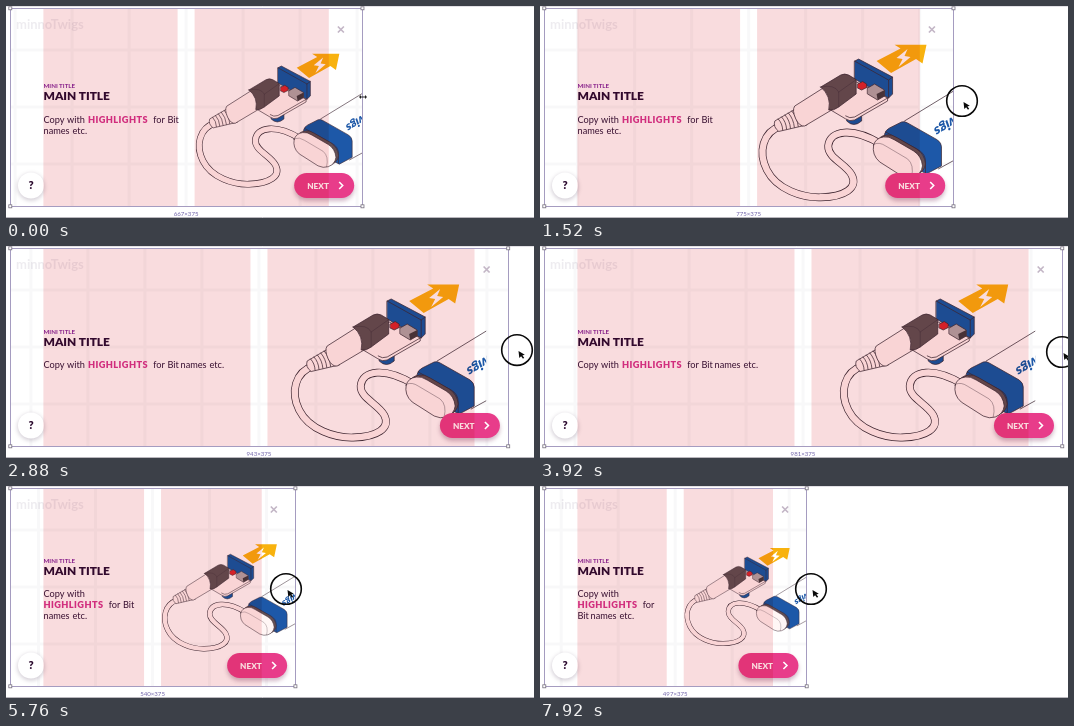
Animation, 528 px wide and 212 px high, one loop 8000 ms. Source, as an HTML page:

```html
<!DOCTYPE html>
<html lang="en">
<head>
<meta charset="utf-8">
<title>Responsive card</title>
<style>
  html, body { margin: 0; width: 100%; height: 100%; overflow: hidden; background: #fff; }
  svg { display: block; width: 528px; height: 212px; }
  text { font-family: Lato, "Open Sans", sans-serif; }
  .line { stroke: #3f2a36; stroke-width: .75; stroke-linejoin: round; stroke-linecap: round; }
  .pale { fill: #fff6f5; }
  .blue { fill: #1d58a8; }
  .brown { fill: #655155; }
  .col { fill: #f9dcde; mix-blend-mode: multiply; }
  .copy { font-size: 9.2px; fill: #3a1238; }
  .strong { font-weight: 900; fill: #d63490; letter-spacing: .4px; }
</style>
</head>
<body>
<svg viewBox="0 0 528 212" xmlns="http://www.w3.org/2000/svg">
  <defs>
    <clipPath id="boardClip"><rect id="clipBox" x="4" y="2" height="198"/></clipPath>
    <clipPath id="artClip"><rect x="290" y="20" width="205" height="185"/></clipPath>
    <filter id="soft" x="-40%" y="-40%" width="180%" height="200%"><feGaussianBlur stdDeviation="2"/></filter>
    <path id="lead" fill="none" d="M322 120C304 126 299 146 308 164C318 184 344 192 362 191.500C386 191 400 182 393 169C387 158 369 152 369.500 140C371 124 394 121 422 138"/>
    <path id="shell" d="M415 139Q417 132 425 131 430 130 436 134L455 145Q463 150 464 160 463 168 455 171 449 173 443 170L421 156Q413 149 415 139Z"/>
  </defs>
  <rect width="528" height="212" fill="#fff"/>
  <path d="M0 .5H528" stroke="#e3e1e6"/>
  <path d="M0 211.5H528" stroke="#b9b7bd"/>

  <g clip-path="url(#boardClip)">
    <rect x="4" y="2" width="524" height="198" fill="#fff"/>
    <path id="grid" fill="none" stroke="#6a5a78" stroke-opacity=".045" stroke-width="3"/>
    <text x="10" y="23" font-size="13" font-weight="700" fill="#5c4668" fill-opacity=".1">minnoTwigs</text>

    <g id="art"><g clip-path="url(#artClip)">
      <!-- power arrow -->
      <path fill="#f8b20e" d="M418 55L442 42.500 436 38.500 468 38.500 464 57.500 457.500 53 432.500 67Z"/>
      <path fill="#fff" d="M449 43L438 52 444 53 440 61 452 51 446 50Z"/>

      <!-- small board -->
      <path class="blue line" d="M388 108V115Q395 122 403 115V107Z"/>
      <path class="blue line" d="M396 55L400 53 434 71V88L430 92 396 73Z"/>
      <path class="line" fill="none" d="M396 55L430 74V92M430 74L434 71"/>
      <path class="pale line" d="M366 100L398 76 429 92V95L396 114Q391 116 387 113Z"/>
      <path class="line" fill="none" d="M387 110Q391 113 396 111L429 92"/>
      <path class="line" fill="#d9262e" d="M399 78L404 75.500 408 78V81.500L403 84 399 82Z"/>
      <path class="line" fill="#b3a8aa" d="M409 82L416 78 426 84V90L419 94 409 88Z"/>
      <path fill="#4a3a3f" d="M418 88L426 84V90L419 94Z"/>

      <!-- lead -->
      <use href="#lead" stroke="#3f2a36" stroke-width="7.800"/>
      <use href="#lead" stroke="#fff6f5" stroke-width="6.400"/>

      <!-- barrel plug and socket -->
      <path class="pale line" d="M340 101L316 115Q314 121 320 125.500L348 119Z"/>
      <path id="ribs" class="line" fill="none"/>
      <path class="pale line" d="M366 81L336 100Q333 104 337 113 341 121 346 120L378 101Z"/>
      <path class="brown line" d="M362 81L382 69Q386 67 390 69L397.500 73.500V88L380 101Q375 105 370 104 373 90 362 81Z"/>
      <path class="line" fill="none" d="M362 81Q376 78 380 86V101M380 86L397 74" stroke-opacity=".5"/>

      <!-- large module -->
      <path class="line" fill="none" d="M446 115L500 82M480 163L500 152"/>
      <path class="blue line" d="M426 128Q427 124 431 122L443 116Q446 115 449 117L479 134Q483 137 483 141V160L468 168 427 147Z"/>
      <path class="line" fill="none" d="M427 126L460 144Q467 148 467 156V167"/>
      <text class="blue" transform="translate(475 122.500) rotate(148) skewX(-12)" text-anchor="end" font-size="13.500" font-weight="900">minnoTwigs</text>
      <use href="#shell" class="brown line" x="3" y="-2"/>
      <use href="#shell" class="pale line"/>
      <path class="line" fill="none" d="M416 138Q421 136 427 140L449 153Q456 159 453 171" stroke-opacity=".5"/>
    </g></g>

    <g id="words">
      <text x="37.500" y="82.200" font-size="6.200" font-weight="700" fill="#8a239e">MINI TITLE</text>
      <text x="37.500" y="94.300" font-size="11.900" font-weight="900" fill="#330a33">MAIN TITLE</text>
    </g>

    <circle cx="25" cy="181" r="13.500" fill="#503a5c" opacity=".25" filter="url(#soft)"/>
    <circle cx="25" cy="179.500" r="13" fill="#fff"/>
    <text x="25" y="183.200" font-size="11" font-weight="900" fill="#2b0a2e" text-anchor="middle">?</text>

    <g id="right">
      <path d="M-24.300 20.500l6 6m0-6l-6 6" stroke="#c3b6c6" stroke-width="1.700"/>
      <rect x="-68" y="170" width="60" height="25" rx="12.500" fill="#7d3560" opacity=".35" filter="url(#soft)"/>
      <rect x="-68" y="167" width="60" height="25" rx="12.500" fill="#e83c8a"/>
      <text x="-55" y="182.600" font-size="8.200" font-weight="900" fill="#fff">NEXT</text>
      <path d="M-23 176l3.500 3.500-3.500 3.500" fill="none" stroke="#fff" stroke-width="1.600"/>
    </g>

    <rect id="colA" class="col" x="37.400" y="2" height="198"/>
    <rect id="colB" class="col" y="2" height="198"/>
  </g>

  <rect id="frame" x="4.500" y="2.500" height="198" fill="none" stroke="#a59cc0"/>
  <g id="handles"></g>
  <text id="size" y="210" font-size="6.100" fill="#6f62a8" text-anchor="middle"></text>

  <path id="resize" d="M-4 0l2-2v1.400h4v-1.400l2 2-2 2v-1.400h-4v1.400z" fill="#222"/>
  <g id="pointer">
    <circle r="15.300" fill="none" stroke="#0a0a0a" stroke-width="1.600"/>
    <path d="M1.500 1l.8 7 1.800-1.700 1.900 2.400 1.200-.9-1.800-2.400 2.400-.6z" fill="#0a0a0a"/>
  </g>
</svg>
<script>
const LOOP = 8000, SCALE = .528, LEFT = 4, MARGIN = 33.4, GUTTER = 17, MID = 101;
const NS = 'http://www.w3.org/2000/svg';
const $ = id => document.getElementById(id);

// time, board width, pointer x
const KEYS = [
  [0, 667, 357], [160, 667, 356], [560, 672, 359], [960, 688, 370],
  [1360, 760, 414], [1520, 775, 422], [1760, 814, 447], [2160, 866, 479],
  [2320, 885, 490], [2560, 905, 499], [2960, 952, 514], [3360, 980, 522],
  [3920, 981, 522], [4160, 981, 520], [4320, 955, 503], [4560, 859, 436],
  [4720, 847, 429], [4960, 826, 418], [5360, 602, 303], [5760, 540, 280],
  [6160, 521, 267], [6560, 499, 252], [6960, 496, 251], [7360, 496, 251],
  [7760, 496, 269], [7920, 497, 271], [8000, 497, 271]
];
const HEIGHTS = [[0, 91], [960, 91], [1520, 95], [2320, 103], [3920, 106], [4720, 103], [8000, 103]];

// word, its width, advance to the next word
const WORDS = [
  ['Copy', 20.5, 23.5], ['with', 18, 21], ['HIGHLIGHTS', 62.3, 65.2], ['for', 12, 14.3],
  ['Bit', 10, 13], ['names', 26.5, 29], ['etc.', 13.5, 16]
];

function set(el, attrs) {
  for (const k in attrs) el.setAttribute(k, attrs[k]);
}

function add(parent, tag, attrs) {
  const el = document.createElementNS(NS, tag);
  set(el, attrs);
  return parent.appendChild(el);
}

function at(keys, t, field) {
  let i = 1;
  while (i < keys.length - 1 && keys[i][0] < t) i++;
  const a = keys[i - 1], b = keys[i];
  return a[field] + (b[field] - a[field]) * (t - a[0]) / (b[0] - a[0]);
}

const wordEls = WORDS.map(([word]) => {
  const el = add($('words'), 'text', { class: word === 'HIGHLIGHTS' ? 'copy strong' : 'copy' });
  el.textContent = word;
  return el;
});
const handles = [0, 1, 2, 3].map(() =>
  add($('handles'), 'rect', { width: 3, height: 3, fill: '#fff', stroke: '#77717f', 'stroke-width': .8 }));

let ribs = '';
for (let i = 1; i < 7; i++) {
  const x = 316 + i * 3.4, y = 115 - i * 2;
  ribs += `M${x} ${y}q${4 + i * .3} ${4 + i * .5} ${4 + i * .5} ${10 + i * 1.1}`;
}
set($('ribs'), { d: ribs });

function flow(limit) {
  let x = 0, row = 0;
  WORDS.forEach(([, width, advance], i) => {
    if (x + width > limit) { x = 0; row++; }
    set(wordEls[i], { x: 37.5 + x, y: 116.7 + row * 11 });
    x += advance;
  });
  set($('words'), { transform: `translate(0 ${(1 - row) * 5.5})` });
}

// Ten steps a second on an 80 ms clock: every fifth tick repeats.
function tick(ms) {
  const t = Math.floor(ms % LOOP / 80) * 80;
  return t % 400 === 240 ? t - 80 : t;
}

function gridPath(center, right) {
  let d = '';
  for (let y = 44; y < 200; y += 57) d += `M${LEFT} ${y}H${right}`;
  for (let x = center - 57 * 5; x < right; x += 57) if (x > LEFT) d += `M${x} 2V200`;
  return d;
}

function draw(ms) {
  const t = tick(ms);
  const units = Math.round(at(KEYS, t, 1));
  const width = units * SCALE, right = LEFT + width, center = LEFT + width / 2;
  const col = (width - 2 * MARGIN - GUTTER) / 2;
  const colX = LEFT + MARGIN + col + GUTTER;

  set($('clipBox'), { width });
  set($('frame'), { width: Math.round(width) });
  set($('colA'), { width: col });
  set($('colB'), { x: colX, width: col });
  set($('grid'), { d: gridPath(center, right) });
  set($('right'), { transform: `translate(${right} 0)` });
  flow(col);

  const scale = Math.min(1, (right - colX) / 196.5);
  set($('art'), {
    transform: `translate(${(colX + right) / 2} ${MID}) scale(${scale}) translate(-396.5 ${-MID})`
  });

  handles.forEach((el, i) => set(el, { x: (i % 2 ? right : LEFT) - 1.2, y: (i < 2 ? 2 : 200) - 1.2 }));
  set($('size'), { x: center });
  $('size').textContent = `${units}×375`;

  const spot = `translate(${at(KEYS, t, 2)} ${at(HEIGHTS, t, 1)})`;
  set($('pointer'), { transform: spot, opacity: Math.min(1, t / 160) });
  set($('resize'), { transform: spot, opacity: t < 80 ? 1 : 0 });
}

const start = performance.now();
function loop() {
  draw(performance.now() - start);
  requestAnimationFrame(loop);
}
loop();
</script>
</body>
</html>
```
